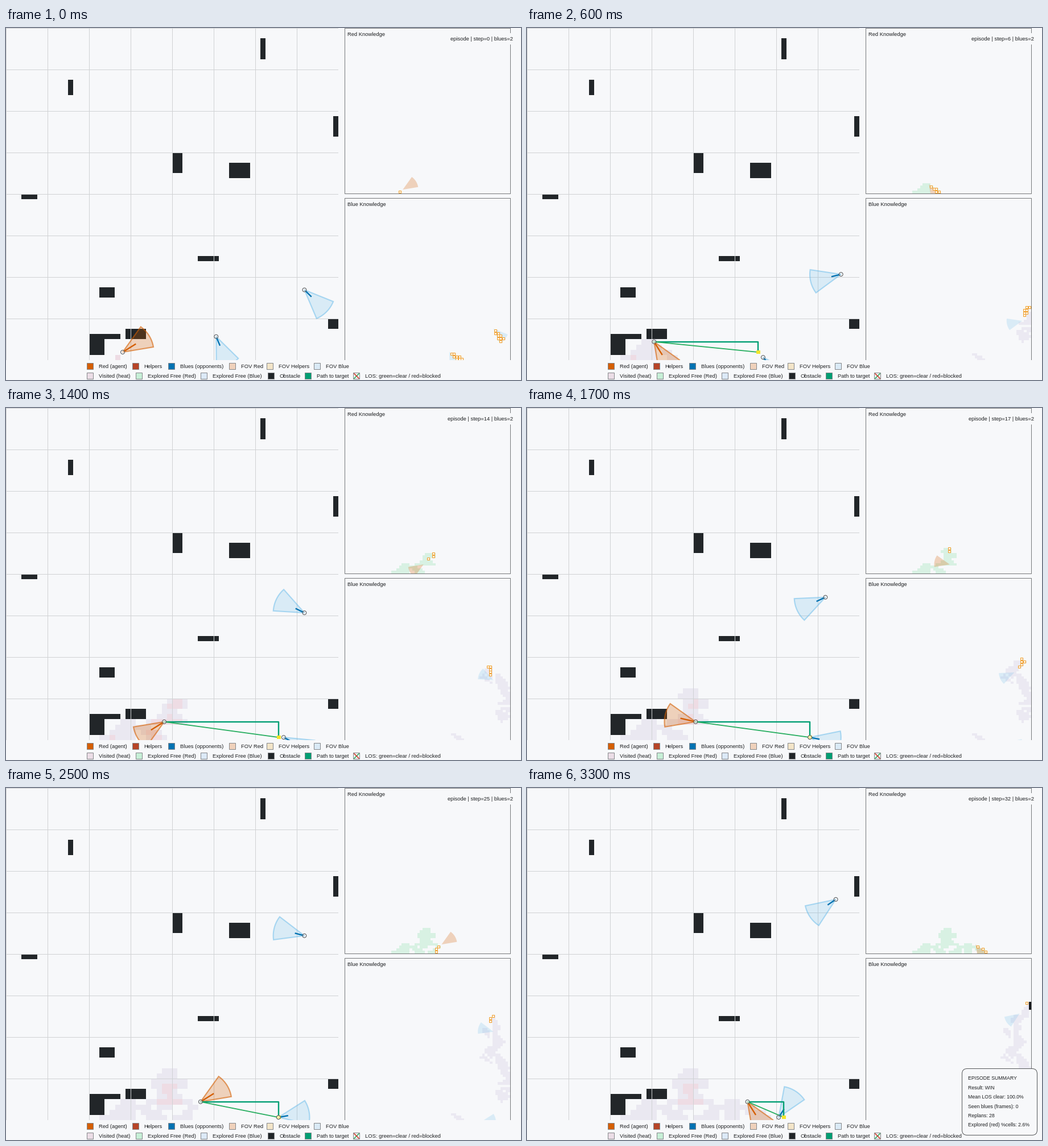
A matplotlib script that plays this animation: 905 by 619 pixels, repeating every 3.4 s.

```python
import numpy as np
import matplotlib.pyplot as plt
from matplotlib.animation import FuncAnimation
from matplotlib.patches import Circle, FancyBboxPatch, Polygon, Rectangle

W, H, DPI = 905, 619, 100
N = 64
CELL = 584 / N
MINI = 291 / N
LAST = 32
REACH, HALF = 6, 22.5

BG = "#f7f8fa"
INK = "#1e2022"
RED, BLUE, SKY, PATH = "#d55e00", "#0072b2", "#56b4e9", "#009e73"
DARK = "#222629"
FRONTIER = "#f0a030"

WALLS = [(49, 2, 1, 4), (12, 10, 1, 3), (63, 17, 1, 4), (32, 24, 2, 4),
         (43, 26, 4, 3), (3, 32, 3, 1), (37, 44, 4, 1), (18, 50, 3, 2),
         (23, 58, 4, 2), (16, 59, 6, 1), (16, 59, 3, 4), (62, 56, 2, 2)]

plt.rcParams["font.family"] = "Liberation Sans"


def px(v):
    return v * 72 / DPI


# ---- simulation -------------------------------------------------------

def keyed(step, *keys):
    t, v = zip(*keys)
    return np.interp(step, t, v)


def red_pose(s):
    moved = -(-2 * s // 3)
    return 22 + max(0, moved - 2), 62 - min(moved, 2), -32 + 45 * (s // 3)


def scout_pose(s):
    x = keyed(s, (0, 57), (6, 60), (11, 57), (17, 57), (22, 56), (28, 58), (32, 59))
    y = keyed(s, (0, 50), (6, 47), (11, 42), (17, 36), (22, 31), (28, 25), (32, 21))
    a = keyed(s, (0, 44.5), (6, 166), (11, 173), (12, 240), (17, 155), (21, 222),
              (22, 164), (25, 195), (28, 147), (32, 145.6))
    return int(np.round(x)), int(np.round(y)), a


def prey_pose(s):
    x = keyed(s, (0, 40), (5, 44), (6, 45), (11, 50), (15, 54), (17, 54),
              (20, 52), (28, 52), (32, 48))
    y = keyed(s, (0, 59), (5, 62), (6, 63))
    a = keyed(s, (0, 67), (6, 50), (11, 45), (17, 11), (22, -20), (28, 0), (32, -57))
    return int(np.round(x)), int(np.round(y)), a


rows, cols = np.mgrid[:N, :N]
walls = np.zeros((N, N), bool)
for wx, wy, ww, wh in WALLS:
    walls[wy:wy + wh, wx:wx + ww] = True


def seen_from(pose):
    """Cells in the sensor wedge; bearings are measured from straight down."""
    x, y, a = pose
    dx, dy = cols - x, rows - y
    rel = (np.degrees(np.arctan2(dx, dy)) - a + 180) % 360 - 180
    return (np.hypot(dx, dy) <= REACH) & (rel >= -HALF) & (rel <= 0.7)


def simulate():
    heat = np.zeros((N, N))
    known = [np.zeros((N, N), bool) for _ in range(2)]
    log = []
    for s in range(LAST + 1):
        red, scout, prey = red_pose(s), scout_pose(s), prey_pose(s)
        views = [seen_from(red), seen_from(scout) | seen_from(prey)]
        fresh = [v & ~k for v, k in zip(views, known)]
        known = [v | k for v, k in zip(views, known)]
        heat = heat + (views[0] & ~walls)
        log.append(dict(red=red, blues=[scout, prey], heat=heat, known=known,
                        fresh=fresh, target=prey_pose(s - 1)[:2] if s else None))
    return log


LOG = simulate()

# ---- static scene -----------------------------------------------------

fig = plt.figure(figsize=(W / DPI, H / DPI), dpi=DPI, facecolor=BG)
ax = fig.add_axes([0, 0, 1, 1])
ax.axis("off")


# One-pixel strokes on whole coordinates snap to that pixel row or column.
def box(x, y, w, h, z, fc=BG, ec="none", lw=1.0):
    return ax.add_patch(Rectangle((x, y), w, h, fc=fc, ec=ec, lw=px(lw), zorder=z))


def label(x, y, s, size=9.4, z=12, **kw):
    return ax.text(x, y + 3.4, s, fontsize=px(size), color=INK, zorder=z,
                   va="baseline", **kw)


def line(xs, ys, color, lw, z, **kw):
    return ax.plot(xs, ys, color=color, lw=px(lw), zorder=z, **kw)[0]


def edge_px(c):
    return int(c * CELL + .36)


def raster(x, y, size, z):
    return ax.imshow(np.zeros((N, N, 4)), extent=(x, x + size, y + size, y),
                     interpolation="nearest", aspect="auto", zorder=z)


heat_img = raster(-.14, -.14, 584, 1)
for wx, wy, ww, wh in WALLS:
    x0, y0 = edge_px(wx), edge_px(wy)
    box(x0, y0, edge_px(wx + ww) - x0, edge_px(wy + wh) - y0, 2, DARK)
for g in range(0, 584, 73):
    line([g, g], [0, 584], "#d0d2d4", 1, 3)
    line([0, 584], [g, g], "#d0d2d4", 1, 3)

box(584, 0, W - 584, H, 6)
panels, maps = [], []
for top, title in ((0, "Red Knowledge"), (299, "Blue Knowledge")):
    panels.append(box(595, top, 291, 291, 9, "none", "#77797b"))
    maps.append(raster(595, top, 291, 7))
    label(600, top + 10.5, title)

box(0, 584, W, H - 584, 10)
LEGEND = [
    (595, [(142, "Red (agent)", RED), (222, "Helpers", "#b74528"),
           (285, "Blues (opponents)", BLUE), (392, "FOV Red", "#efd1bb"),
           (458, "FOV Helpers", "#f3e5c8"), (541, "FOV Blue", "#d9eaf6")]),
    (612, [(142, "Visited (heat)", "#ebdde6"),
           (228, "Explored Free (Red)", "#c6efd6"),
           (342, "Explored Free (Blue)", "#dce9f7"), (460, "Obstacle", "#202427"),
           (525, "Path to target", PATH),
           (610, "LOS: green=clear / red=blocked", "#f4f4f4")])]
for cy, items in LEGEND:
    for x, name, color in items:
        box(x, cy - 6, 11, 11, 11, color, "#85878a")
        label(x + 20.5, cy, name)
line([612, 620], [616, 608], "#27ae60", 1.6, 12)
line([612, 620], [608, 616], "#d0392b", 1.6, 12)

status_bg = box(772, 9, 125, 20, 11)
status = label(891, 19, "", ha="right")

summary = [ax.add_patch(FancyBboxPatch(
    (764.5, 493.5), 132, 117, boxstyle="round,pad=0,rounding_size=9",
    fc=BG, ec="#55585a", lw=px(1), zorder=14))]
for i, row in enumerate(("EPISODE SUMMARY", "Result: WIN", "Mean LOS clear: 100.0%",
                         "Seen blues (frames): 0", "Replans: 28",
                         "Explored (red) %cells: 2.6%")):
    summary.append(label(774.5, 510 + 16.4 * i, row, size=8.8, z=15))

ax.set_xlim(0, W)
ax.set_ylim(H, 0)

# ---- per-step drawing -------------------------------------------------

moving = []


def keep(artist):
    moving.append(artist)
    return artist


def centre(cell):
    return (cell[0] + .5) * CELL - .3, (cell[1] + .5) * CELL - .3


def wedge(x, y, a, r):
    t = np.radians(np.linspace(a - HALF, a + HALF, 13))
    arc = np.column_stack([x + r * np.cos(t), y + r * np.sin(t)])
    return np.vstack([[x, y], arc])


def draw_fov(pose, color, fill, edge):
    pts = wedge(*centre(pose), pose[2], REACH * CELL)
    keep(ax.add_patch(Polygon(pts, fc=color, alpha=fill, lw=0, zorder=4)))
    keep(ax.add_patch(Polygon(pts, fc="none", ec=color, alpha=edge,
                              lw=px(2.1), zorder=4.1)))


def draw_agent(pose, color, reach):
    x, y = centre(pose)
    a = np.radians(pose[2])
    r = reach * CELL
    keep(ax.add_patch(Circle((x, y), 3.4, fc=BG, ec="none", alpha=.6, zorder=5)))
    keep(line([x, x + r * np.cos(a)], [y, y + r * np.sin(a)], color, 2.4, 4.3,
              solid_capstyle="butt"))
    keep(ax.add_patch(Circle((x, y), 3.4, fc="none", ec="#505356",
                             lw=px(1), zorder=5.1)))


def draw_route(start, goal):
    x0, y0 = centre(start)
    x1, y1 = centre(goal)
    keep(line([x0, x1, x1], [y0, y0, y1], PATH, 2.4, 4.5))
    keep(line([x0, x1], [y0, y1], "#27ae60", 1.8, 4.6))
    keep(box(x1 - 3, y1 - 3, 7, 6, 4.7, "#f2e52e"))


def draw_panel(i, state, poses, color, fill):
    known, tint = state["known"][i], ((216, 241, 227), (235, 233, 242))[i]
    img = np.zeros((N, N, 4))
    img[known] = [c / 255 for c in tint] + [1]
    img[known & walls] = (.09, .1, .11, 1)
    maps[i].set_data(img)
    top = 299 * i
    for x, y, a in poses:
        pts = wedge(595 + (x + .5) * MINI, top + (y + .5) * MINI, a, REACH * MINI)
        fov = keep(ax.add_patch(Polygon(pts, fc=color, alpha=fill, lw=0, zorder=8)))
        fov.set_clip_path(panels[i])
    for y, x in np.argwhere(state["fresh"][i] & ~walls):
        keep(box(int(595 + x * MINI), int(top + y * MINI), 4, 4,
                 8.5, "#fdf3e2", FRONTIER, 1))


def heat_rgba(heat):
    hot = heat > .6 * heat.max()
    rgb = np.where(hot[..., None], (238, 220, 228), (234, 232, 241)) / 255
    return np.dstack([rgb, heat > 0])


def draw(frame):
    while moving:
        moving.pop().remove()
    step = min(frame, LAST)
    state = LOG[step]
    red, blues = state["red"], state["blues"]

    heat_img.set_data(heat_rgba(state["heat"]))
    for pose in blues:
        draw_fov(pose, SKY, .18, .45)
    draw_fov(red, RED, .25, .6)
    for pose in blues:
        draw_agent(pose, BLUE, 1.9)
    draw_agent(red, RED, 3)
    if state["target"]:
        draw_route(red, state["target"])

    draw_panel(0, state, [red], RED, .25)
    draw_panel(1, state, blues, SKY, .18)

    status.set_text(f"episode | step={step} | blues=2")
    status_bg.set_x(777 if step < 10 else 772)
    status_bg.set_width(897 - status_bg.get_x())
    for part in summary:
        part.set_visible(frame > LAST)
    return []


anim = FuncAnimation(fig, draw, frames=LAST + 2, interval=100,
                     init_func=lambda: draw(0), repeat=True, repeat_delay=0)
plt.show()
```
